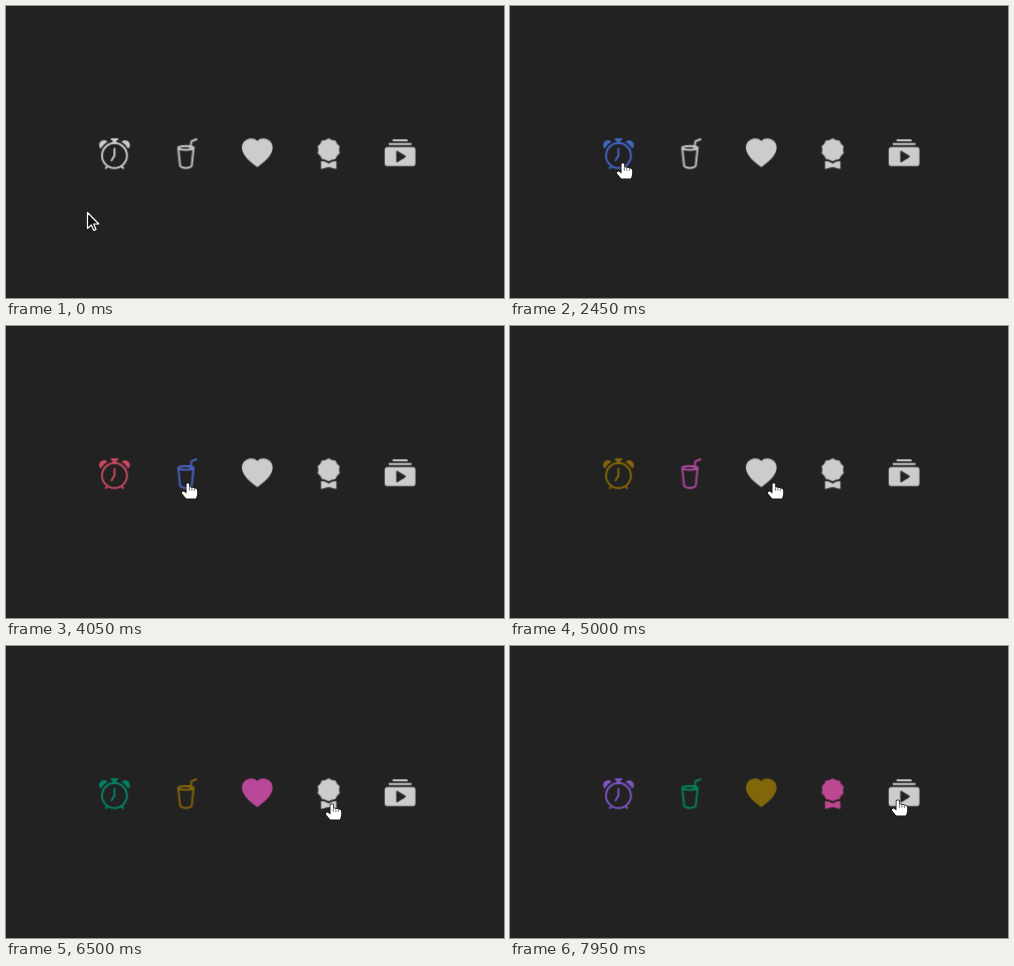
An HTML page that plays this animation: 498x292 px, repeating every 8 s.

```html
<!DOCTYPE html>
<html lang="en">
<head>
<meta charset="utf-8">
<title>Icon colours</title>
<style>
  html, body { margin: 0; width: 100%; height: 100%; overflow: hidden; background: #222; }
  svg { display: block; width: 498px; height: 292px; }

  /* Grey is unaffected by hue rotation, so the hue can turn all the time. */
  .icon {
    --on: #6a5bc7;
    color: #ccc;
    fill: currentColor;
    animation: var(--lit, none) 8s step-end infinite, hue 8s linear infinite;
  }
  .line { fill: none; stroke: currentColor; stroke-linecap: round; stroke-linejoin: round; }
  .clock { --lit: lit-clock; --hue: -200.6deg; }
  .cup { --lit: lit-cup; --hue: -310deg; }
  .heart { --lit: lit-heart; --hue: -411.2deg; }
  .award { --lit: lit-award; --hue: -511.2deg; }
  .play { animation: none; }

  @keyframes hue {
    from { filter: hue-rotate(var(--hue)); }
    to { filter: hue-rotate(calc(var(--hue) + 576deg)); }
  }
  @keyframes lit-clock { 0% { color: #ccc; } 28.75%, 100% { color: var(--on); } }
  @keyframes lit-cup { 0% { color: #ccc; } 47.7%, 100% { color: var(--on); } }
  @keyframes lit-heart { 0% { color: #ccc; } 65.3%, 100% { color: var(--on); } }
  @keyframes lit-award { 0% { color: #ccc; } 82.6%, 100% { color: var(--on); } }

  .cursor { animation: move 8s ease-in-out infinite; }
  .arrow {
    fill: #111; stroke: #fff; stroke-width: 1.2; stroke-linejoin: round;
    animation: arrow 8s step-end infinite;
  }
  .hand {
    fill: #fff; stroke: #111; stroke-width: 1.5; paint-order: stroke;
    animation: hand 8s step-end infinite;
  }
  .gaps { stroke-width: .6; }

  @keyframes move {
    0%, 7.2% { transform: translate(81px, 206px); }
    17.2%, 30.6% { transform: translate(113px, 157px); }
    38.1%, 39.3% { transform: translate(166px, 173px); }
    44.4% { transform: translate(182px, 157px); }
    51.8% { transform: translate(182px, 157px); animation-timing-function: ease-in; }
    55% { transform: translate(222px, 170px); animation-timing-function: ease-out; }
    58.8% { transform: translate(264px, 157px); }
    70.6% { transform: translate(264px, 157px); animation-timing-function: ease-in; }
    73.1% { transform: translate(304px, 158px); animation-timing-function: ease-out; }
    76.9% { transform: translate(326px, 158px); }
    88.75% { transform: translate(326px, 158px); animation-timing-function: ease-in; }
    90.4% { transform: translate(352px, 171px); animation-timing-function: linear; }
    91.9% { transform: translate(376px, 157px); animation-timing-function: ease-out; }
    95%, 100% { transform: translate(388px, 154px); }
  }
  @keyframes arrow {
    0%, 33%, 53.6%, 71.2%, 89.8% { opacity: 1; }
    15%, 42.1%, 56.1%, 73%, 92.2%, 100% { opacity: 0; }
  }
  @keyframes hand {
    0%, 33%, 53.6%, 71.2%, 89.8% { opacity: 0; }
    15%, 42.1%, 56.1%, 73%, 92.2%, 100% { opacity: 1; }
  }
</style>
</head>
<body>
<svg viewBox="0 0 498 292">
  <g transform="translate(93.1 132.3) scale(1.92)">
    <g class="icon clock">
      <path d="M7 .5h2v2H7zM0 3.5c0 .753.333 1.429.86 1.887A8.035 8.035 0 0 1 4.387 1.86 2.5 2.5 0 0 0 0 3.5zM13.5 1c-.753 0-1.429.333-1.887.86a8.035 8.035 0 0 1 3.527 3.527A2.5 2.5 0 0 0 13.5 1z"/>
      <circle class="line" cx="8" cy="9" r="6.5"/>
      <path class="line" d="M6.5.5h3M8 5.5V9l-1.5 2.5M3.48 15.5l1-1M12.52 15.5l-1-1"/>
    </g>
  </g>
  <g transform="translate(164.5 132.3) scale(1.92)">
    <g class="icon cup">
      <ellipse class="line" cx="8" cy="5" rx="4" ry="1"/>
      <path class="line" d="M4 5 4.96 14.15Q5 14.55 5.27 14.72C6.8 15.75 9.2 15.75 10.73 14.72Q11 14.55 11.04 14.15L12 5M13.44.52l-2.5 1L10.2 5"/>
    </g>
  </g>
  <g transform="translate(235.9 132.3) scale(1.92)">
    <path class="icon heart" d="M8 1.314C12.438-3.248 23.534 4.735 8 15-7.534 4.736 3.562-3.248 8 1.314z"/>
  </g>
  <g transform="translate(307.3 132.3) scale(1.92)">
    <path class="icon award" d="m8 0 1.669.864 1.858.282.842 1.68 1.337 1.32L13.4 6l.306 1.854-1.337 1.32-.842 1.68-1.858.282L8 12l-1.669-.864-1.858-.282-.842-1.68-1.337-1.32L2.6 6l-.306-1.854 1.337-1.32.842-1.68L6.331.864zM4 11.794V16l4-1 4 1v-4.206l-2.018.306L8 13.126 6.018 12.1z"/>
  </g>
  <g transform="translate(378.7 132.3) scale(1.92)">
    <g class="icon play">
      <path class="line" d="M2.5 3h11M4.5 1h7"/>
      <path d="M0 13a1.5 1.5 0 0 0 1.5 1.5h13A1.5 1.5 0 0 0 16 13V6a1.5 1.5 0 0 0-1.5-1.5h-13A1.5 1.5 0 0 0 0 6v7zm6.258-6.437a.5.5 0 0 1 .507.013l4 2.5a.5.5 0 0 1 0 .848l-4 2.5A.5.5 0 0 1 6 12V7a.5.5 0 0 1 .258-.437z"/>
    </g>
  </g>
  <g class="cursor">
    <path class="arrow" d="M.5.5V16.5L4.3 12.9 6.8 18.4 9 17.5 6.7 12H11.8z"/>
    <g class="hand">
      <path d="M-1.5.9Q-.1-.6 1.2.9V4.8Q2.5 3.8 3.8 5 5.2 4.2 6.3 5.6 9 5.2 9.2 7.6V11.5L8 15.6H-1.8L-6 10.6Q-6.6 8.4-4.2 8.6L-1.5 10.6z"/>
      <path class="gaps" d="M1.3 5v2.8M3.9 5.2v2.6M6.4 5.8v2"/>
    </g>
  </g>
</svg>
</body>
</html>
```
